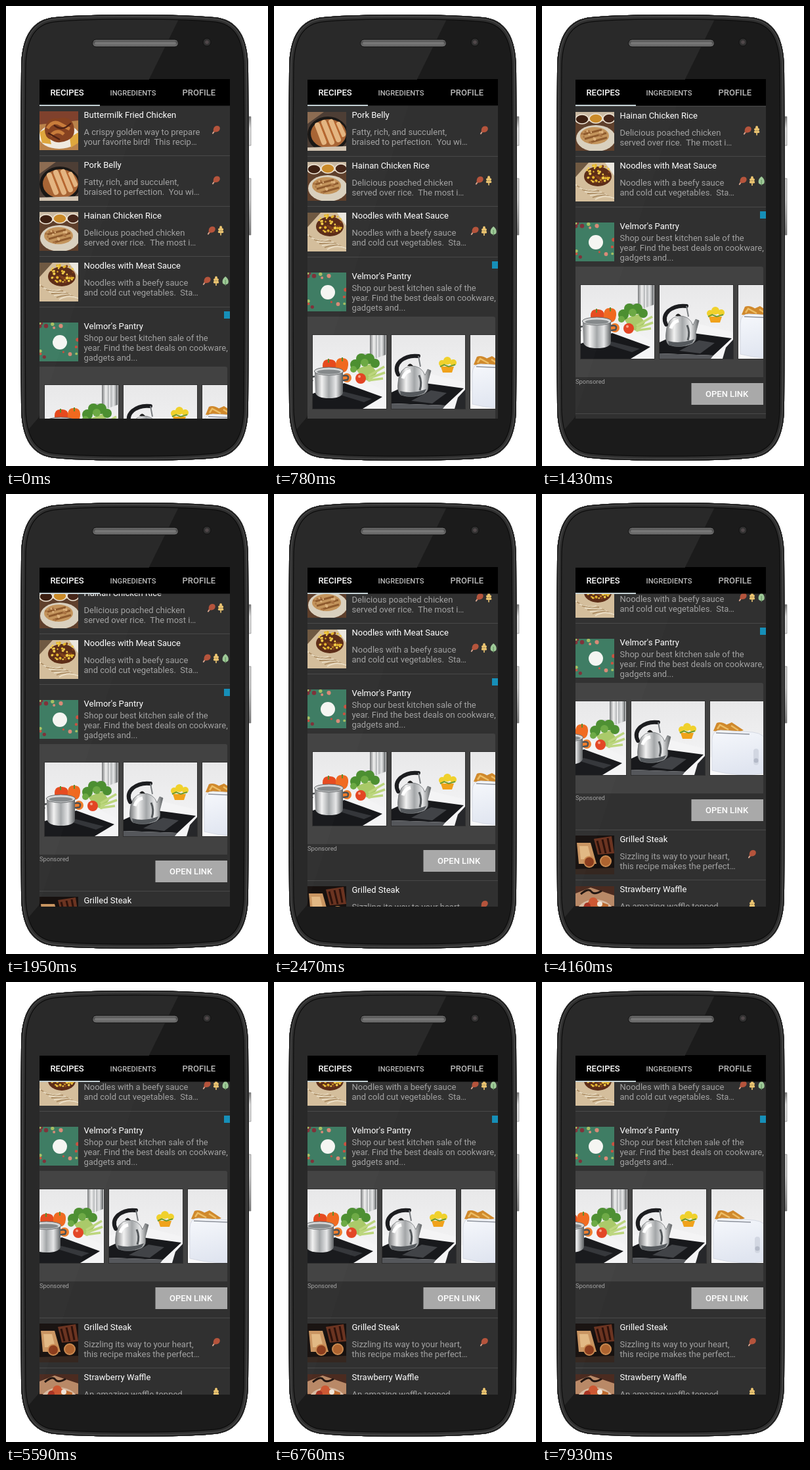
Animation of 399 by 699 pixels, one loop 8000 ms. Source, as an HTML page:

```html
<!DOCTYPE html>
<html lang="en">
<head>
<meta charset="utf-8">
<title>Recipe list on a phone</title>
<style>
html, body { margin: 0; width: 100%; height: 100%; overflow: hidden; background: #fff; }
svg { display: block; }
#stage { width: 399px; height: 699px; }
text { font: 13px Roboto, sans-serif; white-space: pre; fill: #a2a2a2; }
.title { fill: #fff; }
.tab { font-weight: 500; fill: #b9b9b9; }
.on { fill: #fff; }
.tiny { font-size: 9.4px; }
</style>
</head>
<body>
<svg id="stage" viewBox="0 0 399 699">
  <defs>
    <linearGradient id="steel"><stop stop-color="#77797b"/><stop offset=".25" stop-color="#f2f2f2"/><stop offset=".5" stop-color="#a3a6a8"/><stop offset=".75" stop-color="#e6e7e8"/><stop offset="1" stop-color="#5c5f61"/></linearGradient>
    <linearGradient id="key" x2="0" y2="1"><stop stop-color="#777"/><stop offset=".1" stop-color="#e2e2e2"/><stop offset=".7" stop-color="#c8c8c8"/><stop offset="1" stop-color="#777"/></linearGradient>
    <linearGradient id="slot" x2="0" y2="1"><stop stop-color="#8a8a8a"/><stop offset=".3" stop-color="#4a4a4a"/><stop offset="1" stop-color="#777"/></linearGradient>
    <linearGradient id="wall" x2="0" y2="1"><stop stop-color="#e8e8e9"/><stop offset="1" stop-color="#f6f6f7"/></linearGradient>
    <linearGradient id="toaster" x2=".3" y2="1"><stop stop-color="#f6f8fc"/><stop offset="1" stop-color="#e0e5f0"/></linearGradient>
    <path id="shell" d="M196 13C150 13 105 14 75 17C40 20 23 46 23 96Q21 352 23 608C23 658 40 684 75 687C105 690 150 691 196 691S287 690 317 687C352 684 369 658 369 608Q371 352 369 96C369 46 352 20 317 17C287 14 242 13 196 13Z"/>
    <clipPath id="body"><use href="#shell"/></clipPath>

    <g id="leg"><path d="M-3 2L-5 5" stroke="#d9a58f" stroke-width="2" stroke-linecap="round"/><path d="M-4 2.500C-5-2-3-6.500 1.500-6.500S7-2 4.500 1Q2 4-4 2.500Z" fill="#b5543c"/></g>
    <g id="wheat" fill="#ecc571"><path d="M-.8 0H.8V7H-.8Z"/><ellipse cy="-5" rx="2" ry="2.500"/><ellipse cx="-1.800" cy="-2" rx="2.200" ry="1.900"/><ellipse cx="1.800" cy="-2" rx="2.200" ry="1.900"/><ellipse cx="-1.900" cy="1.700" rx="2.300" ry="1.900"/><ellipse cx="1.900" cy="1.700" rx="2.300" ry="1.900"/></g>
    <g id="leaf"><path d="M0-7C4-4 5.500 0 4 3.500Q2 5.500 0 5.500T-4 3.500C-5.500 0-4-4 0-7Z" fill="#9fca98"/><path d="M0-2V7" stroke="#5f8f5c"/></g>

    <g id="chicken">
      <path d="M0 0H59V59H0Z" fill="#b98048"/><path d="M0 0H59V14L0 20Z" fill="#7d3f2b"/>
      <ellipse cx="30" cy="38" rx="31" ry="19" fill="#efe9df"/>
      <path d="M0 32L12 25 18 50 4 48ZM46 40L59 32V48L48 55Z" fill="#dfa63b"/>
      <path d="M8 27Q12 8 28 11Q48 6 52 22Q56 38 43 44Q28 51 17 43Q8 40 8 27Z" fill="#85401e"/>
      <path d="M12 26Q20 13 31 19T46 27M17 37Q27 26 37 35" stroke="#c77a39" stroke-width="5" fill="none"/>
      <path d="M22 21Q35 32 48 18M13 33L31 43" stroke="#4b1e10" stroke-width="2.500" fill="none"/>
    </g>
    <g id="pork">
      <path d="M0 0H59V59H0Z" fill="#4b3c33"/><path d="M0 0H25L0 18Z" fill="#8b6a50"/>
      <ellipse cx="31" cy="34" rx="31" ry="27" fill="#171513"/><ellipse cx="32" cy="33" rx="27" ry="22" fill="#a76333"/>
      <path d="M15 20L25 46M25 16L37 46M36 15L47 42M47 19L54 34" stroke="#e4b47f" stroke-width="8" stroke-linecap="round"/>
      <path d="M20 19L31 47M31 15L42 44M42 16L52 39" stroke="#b9652c" stroke-width="2"/><path d="M0 54L59 52V59H0Z" fill="#d2c4b2"/>
    </g>
    <g id="rice">
      <path d="M0 0H59V59H0Z" fill="#5d3e29"/><path d="M0 0H59V14H0Z" fill="#c9b9a2"/>
      <g stroke="#eee4d4" stroke-width="1.500"><ellipse cx="10" cy="11" rx="10" ry="7" fill="#3b1d0f"/><ellipse cx="31" cy="10" rx="10" ry="7" fill="#c98a27"/><ellipse cx="51" cy="10" rx="9" ry="7" fill="#442417"/></g>
      <ellipse cx="31" cy="40" rx="30" ry="20" fill="#d9cfbd"/><ellipse cx="29" cy="36" rx="22" ry="13" fill="#c2935a"/>
      <path d="M12 34L40 27M14 41L47 32M23 46L48 39" stroke="#8e592c" stroke-width="3"/>
    </g>
    <g id="noodles">
      <path d="M0 0H59V59H0Z" fill="#d3bd9b"/><path d="M0 0H20L0 22Z" fill="#6d5740"/><path d="M45 0H59V20Z" fill="#ebe7df"/>
      <ellipse cx="34" cy="21" rx="21" ry="15" fill="#5b2b15"/>
    </g>
    <g id="market"><path d="M0 0H59V59H0Z" fill="#3d7b62"/><circle cx="31" cy="30" r="11" fill="#f5f5f2"/></g>
    <g id="steak">
      <path d="M0 0H59V59H0Z" fill="#17110f"/><path d="M2 11H23L32 43H5Z" fill="#c99561"/><path d="M6 16H19L24 36H8Z" fill="#e2b884"/>
      <path d="M28 5L55 1 59 27 34 29Z" fill="#6b3421"/><path d="M33 8L38 27M41 6L46 27M49 4L53 25" stroke="#2d120b" stroke-width="3"/>
      <g stroke="#c98950" stroke-width="2"><circle cx="21" cy="40" r="8" fill="#8c3d1d"/><circle cx="46" cy="39" r="8" fill="#ae6430"/></g>
      <path d="M0 51L59 49V59H0Z" fill="#352720"/>
    </g>
    <g id="waffle">
      <path d="M0 0H59V59H0Z" fill="#4b2b20"/><path d="M0 11L23 2 59 14V30H0Z" fill="#b98967"/><path d="M8 12Q20 2 24 8T40 7" stroke="#231713" stroke-width="3" fill="none"/>
      <ellipse cx="30" cy="42" rx="29" ry="22" fill="#d8bba3"/><path d="M8 34L25 19 50 28 48 52 14 52Z" fill="#bd6a2f"/>
      <circle cx="27" cy="24" r="7" fill="#cd5833"/><circle cx="37" cy="27" r="4" fill="#efe4d7"/><circle cx="18" cy="30" r="5" fill="#a93424"/>
    </g>

    <g id="pot">
      <path d="M0 0H112V112H0Z" fill="url(#wall)"/><path d="M0 68L60 60 112 86V112H0Z" fill="#f4f4f5"/>
      <path d="M87 0H98V35L87 36ZM100 0H111V30L100 34Z" fill="url(#steel)"/><path d="M75 28H86V36H75Z" fill="#c8cacb"/>
      <path d="M0 89L48 73 106 94 76 112H0Z" fill="#17181b"/><path d="M47 86L90 97 78 102 42 91Z" fill="#34363a"/>
      <path d="M66 52L88 44 98 57 87 71 76 66Z" fill="#a9c968"/>
      <g fill="#4c8f31"><circle cx="65" cy="45" r="8"/><circle cx="74" cy="36" r="8"/><circle cx="86" cy="36" r="8"/><circle cx="95" cy="43" r="7"/></g>
      <g fill="#6ca944"><circle cx="62" cy="52" r="5"/><circle cx="79" cy="42" r="6"/></g>
      <path d="M85 62L109 48M85 66L110 57M84 69L107 66" stroke="#bcd67d" stroke-width="3.500"/>
      <path d="M15 47Q15 36 25 37Q36 36 36 47T25 59Q15 58 15 47Z" fill="#e64a1e"/><path d="M35 44Q36 34 45 35Q55 35 54 46T45 57Q34 57 35 44Z" fill="#f0691f"/><path d="M24 36V42M45 34V40" stroke="#5d8c2c" stroke-width="2"/>
      <circle cx="52" cy="65" r="7" fill="#f07d2b"/><circle cx="73" cy="66" r="8" fill="#e34524"/><circle cx="71" cy="63" r="2" fill="#f6a58a"/>
      <path d="M3 55H46V88Q43 96 25 96T4 88Z" fill="url(#steel)"/><ellipse cx="24.500" cy="55" rx="22" ry="6" fill="#d5d7d8" stroke="#676a6c"/><ellipse cx="24.500" cy="56" rx="18" ry="3.500" fill="#85898b"/>
      <path d="M46 62Q57 60 53 68L46 69M3 63Q-5 63 0 70" stroke="#4d5052" stroke-width="2.500" fill="none"/>
    </g>
    <g id="kettle">
      <path d="M0 0H112V112H0Z" fill="url(#wall)"/><path d="M0 70L55 58 112 72V112H0Z" fill="#f4f4f5"/>
      <path d="M0 87L35 71 110 81 82 107 0 104Z" fill="#18191c"/><path d="M0 104L82 107 78 112H0Z" fill="#55575b"/>
      <path d="M101 95L112 83V112H96Z" fill="#26272a"/>
      <path d="M30 100L60 84 84 88 62 104Z" fill="#414347"/>
      <path d="M75 48H95L92 57H78Z" fill="#f0a21b"/><g fill="#f0d12c"><circle cx="77" cy="43" r="5"/><circle cx="85" cy="39" r="6"/><circle cx="94" cy="42" r="5"/></g><path d="M74 48L80 45 87 48 97 45" stroke="#6b9a32" stroke-width="2" fill="none"/>
      <path d="M10 72Q11 50 29 47Q45 46 51 61L55 52 60 54 55 73Q58 84 50 89Q32 97 14 91Q8 86 10 72Z" fill="url(#steel)" stroke="#64686b" stroke-width=".7"/>
      <path d="M13 85Q32 90 53 82L50 88Q32 97 14 91Z" fill="#55595d"/><path d="M17 66Q20 56 29 54" stroke="#fff" stroke-width="5" fill="none"/><path d="M42 61Q47 72 43 84" stroke="#54585b" stroke-width="3" fill="none"/>
      <path d="M10 60Q4 48 14 39Q25 30 41 32" stroke="#1c1d20" stroke-width="6" stroke-linecap="round" fill="none"/><path d="M41 32L44 48" stroke="#777b7e" stroke-width="2"/><path d="M24 47Q28 40 33 47" fill="#222"/>
    </g>
    <g id="toast">
      <path d="M0 0H112V112H0Z" fill="url(#wall)"/><path d="M0 85H112V112H0Z" fill="#f9f9fa"/>
      <path d="M5 45L10 33Q17 30 26 36L37 45 34 49ZM24 36L33 32 51 44 39 48Z" fill="#d0892c"/><path d="M11 42L15 36 28 43M32 37L43 44" stroke="#ecbd65" stroke-width="2.500" fill="none"/>
      <path d="M3 105V59Q3 44 16 44L65 47Q85 49 86 65V109Q45 116 3 105Z" fill="url(#toaster)" stroke="#d5d9e3"/><path d="M9 48L60 50" stroke="#8d929c" stroke-width="1.500"/>
      <rect x="66" y="72" width="8" height="25" rx="4" fill="#d2d7e2"/><circle cx="70" cy="90" r="3.500" fill="#b4bac8"/>
    </g>
  </defs>

  <!-- Phone -->
  <path d="M369 168H373V212H369ZM369 262H373V348H369Z" fill="url(#key)" stroke="#777" stroke-width=".6"/>
  <g clip-path="url(#body)">
    <path d="M20 10H372V692H20Z" fill="#1b1b1b"/>
    <path d="M20 10H268L218 111 100 470 50 625 20 660Z" fill="#292929"/>
    <g fill="none">
      <use href="#shell" stroke="#0d0d0d" stroke-width="15"/>
      <use href="#shell" stroke="#303030" stroke-width="12.500"/>
      <use href="#shell" stroke="#4b4b4b" stroke-width="6.500"/>
      <use href="#shell" stroke="#222" stroke-width="4"/>
    </g>
  </g>
  <rect x="131.500" y="51" width="131" height="11" rx="5.500" fill="url(#slot)" stroke="#111"/>
  <rect x="135" y="54.500" width="124" height="4" rx="2" fill="#777"/>
  <circle cx="306" cy="55" r="6" fill="#303030" stroke="#111"/><circle cx="306" cy="55" r="2.800" fill="#50484a"/>

  <!-- Screen; inner coordinates match the stage -->
  <svg x="51" y="111" width="290" height="516" viewBox="51 111 290 516">
    <path d="M51 111H341V627H51Z" fill="#303030"/>
    <g id="list"></g>
    <path d="M51 151H205L100 470 51 622Z" fill="#fff" opacity=".012"/>
    <path d="M51 111H341V151.500H51Z" fill="#000"/>
    <path d="M51 111.500H218" stroke="#252525"/>
    <path d="M51 150H143V152H51Z" fill="#c3d0d4"/>
    <text class="tab on" x="67.500" y="136">RECIPES</text>
    <text class="tab" x="158.500" y="135.600" style="font-size:11.2px">INGREDIENTS</text>
    <text class="tab" x="268.500" y="136">PROFILE</text>
  </svg>
</svg>
<script>
const list = document.getElementById('list');

const use = (id, x, y) => `<use href="#${id}" x="${x}" y="${y}"/>`;
const text = (x, y, str, cls = '') => `<text class="${cls}" x="${x}" y="${y}">${str}</text>`;
const rule = y => `<path d="M51 ${y}H341" stroke="#484848"/>`;
const thumb = (id, y) => `<svg x="51" y="${y}" width="59" height="59">${use(id, 0, 0)}</svg>`;
const append = (id, markup) => document.getElementById(id).insertAdjacentHTML('beforeend', markup);

// y is the centre line of the title
function row(y, photo, title, lines, icons) {
  const marks = icons.map((id, i) => use(id, 320 + (i - (icons.length - 1) / 2) * 14.2, y + 23.5));
  return thumb(photo, Math.round(y - 5)) + text(118.5, y + 4.8, title, 'title') +
    lines.map((s, i) => text(118.5, y + 30.5 + i * 15.3, s)).join('') +
    marks.join('') + rule(Math.round(y + 62) + .5);
}

// Scatter small round bits over a thumbnail
function scatter(id, seed, count, size, colors, inside) {
  const rand = () => (seed = seed * 16807 % 2147483647) / 2147483647;
  let out = '';
  while (count > 0) {
    const x = rand() * 59, y = rand() * 59, r = size * (1 + rand());
    if (!inside(x, y)) continue;
    count--;
    out += `<circle cx="${x.toFixed(1)}" cy="${y.toFixed(1)}" r="${r.toFixed(1)}" fill="${colors[count % colors.length]}"/>`;
  }
  append(id, out);
}

scatter('noodles', 71, 60, 1.1, ['#e6b62b', '#f0ca48', '#7d3f18'], (x, y) => Math.hypot((x - 34) / 20, (y - 17) / 14) < 1);
scatter('market', 913, 16, 1.6, ['#c9503f', '#d98a76', '#a5bd61', '#7e3038'], (x, y) => Math.hypot(x - 31, y - 30) > 15);
scatter('rice', 37, 18, 1.1, ['#ddb17b', '#a87140'], (x, y) => Math.hypot((x - 29) / 22, (y - 36) / 13) < .9);
append('noodles', Array.from({ length: 9 }, (_, i) =>
  `<path d="M${i * 4 - 2} ${32 + i * 3}q16 ${14 - i * 3} 34 ${9 - i}" stroke="${i % 2 ? '#a98a60' : '#ecdfc6'}" stroke-width="1.8" fill="none"/>`).join(''));

const ad = `
  <rect x="332" y="464" width="9" height="11" fill="#168fb8"/>
  ${thumb('market', 481)}
  ${text(118.5, 490.8, "Velmor's Pantry", 'title')}
  ${['Shop our best kitchen sale of the', 'year. Find the best deals on cookware,', 'gadgets and...']
    .map((s, i) => text(118.5, 509 + i * 15.2, s)).join('')}
  <path d="M51 548H334Q337 548 337 551V716H51Z" fill="#424242"/>
  <svg x="51" y="548" width="286" height="168" viewBox="51 548 286 168"><g id="cards">
    ${['pot', 'kettle', 'toast'].map((id, i) => `
      <rect x="${58 + i * 120}" y="575" width="114" height="114" fill="#303030"/>
      <svg x="${59 + i * 120}" y="576" width="112" height="112">${use(id, 0, 0)}</svg>`).join('')}
  </g></svg>
  ${text(51, 726, 'Sponsored', 'tiny')}
  <path d="M227.500 725H337V758H227.500Z" fill="#a9a9a9"/>
  ${text(249, 746.3, 'OPEN LINK', 'tab on')}
  ${rule(771.5)}`;

list.innerHTML =
  row(165, 'chicken', 'Buttermilk Fried Chicken', ['A crispy golden way to prepare', 'your favorite bird!  This recip…'], ['leg']) +
  row(241.5, 'pork', 'Pork Belly', ['Fatty, rich, and succulent,', 'braised to perfection.  You wi…'], ['leg']) +
  row(318, 'rice', 'Hainan Chicken Rice', ['Delicious poached chicken', 'served over rice.  The most i…'], ['leg', 'wheat']) +
  row(394.5, 'noodles', 'Noodles with Meat Sauce', ['Noodles with a beefy sauce', 'and cold cut vegetables.  Sta…'], ['leg', 'wheat', 'leaf']) +
  ad +
  row(785, 'steak', 'Grilled Steak', ['Sizzling its way to your heart,', 'this recipe makes the perfect…'], ['leg']) +
  row(861.5, 'waffle', 'Strawberry Waffle', ['An amazing waffle topped'], ['wheat']);

const cards = document.getElementById('cards');
const LOOP = 8000, STEP = 130;

// [time, offset] pairs, eased between
const scrollKeys = [[0, 0], [130, 0], [1430, 152], [2470, 184], [3380, 261], [LOOP, 261]];
const swipeKeys = [[0, 0], [3380, 0], [4160, 43], [5590, 22], [6760, 14], [7930, 41], [LOOP, 41]];

function at(keys, t) {
  const i = keys.findIndex(k => k[0] > t);
  const [t0, v0] = keys[i - 1], [t1, v1] = keys[i];
  const p = (t - t0) / (t1 - t0);
  return v0 + (v1 - v0) * p * p * (3 - 2 * p);
}

const start = performance.now();
function draw() {
  const t = Math.floor((performance.now() - start) % LOOP / STEP) * STEP;
  list.setAttribute('transform', `translate(0 ${-Math.round(at(scrollKeys, t))})`);
  cards.setAttribute('transform', `translate(${-Math.round(at(swipeKeys, t))} 0)`);
  requestAnimationFrame(draw);
}
draw();
</script>
</body>
</html>
```
